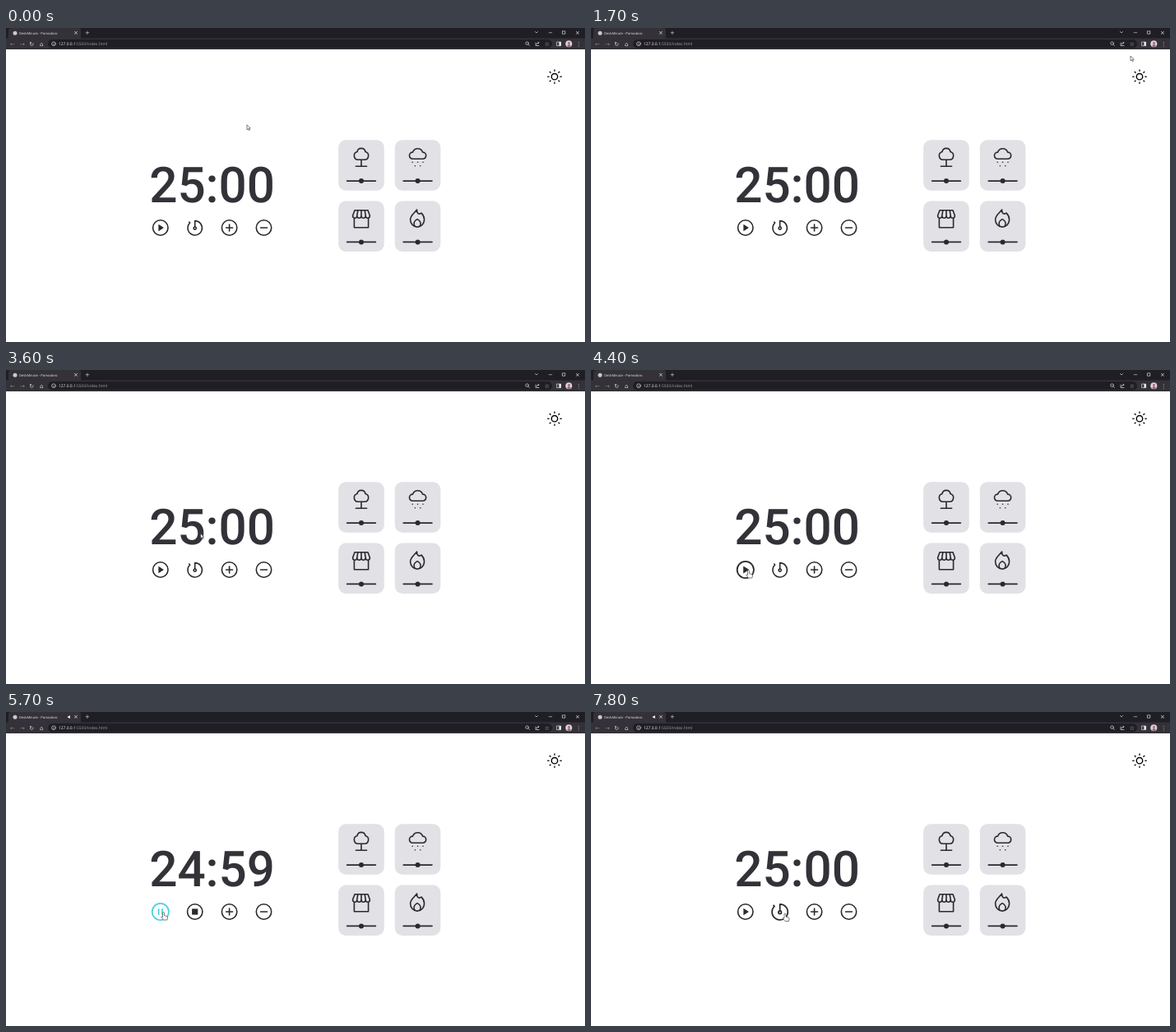
Write an HTML page that moves like this. It is 704 px wide and 382 px high and loops after 8 s.

```html
<!DOCTYPE html>
<html lang="en">
<head>
<meta charset="utf-8">
<title>Pomodoro</title>
<style>
  html, body { margin: 0; width: 100%; height: 100%; overflow: hidden; background: #fff; }
  svg { display: block; width: 100vw; height: 100vh; color: #29292e; }
  text { text-rendering: geometricPrecision; }
  .ui { font-family: "Open Sans", "Noto Sans", sans-serif; }
  .glyph { font: 7px "DejaVu Sans", sans-serif; fill: #dcdce0; text-anchor: middle; }
  .line { fill: none; stroke-linecap: round; stroke-linejoin: round; }
  .chrome { stroke: #dcdce0; stroke-width: .7; }
  .icon { stroke: currentColor; stroke-width: 1.6; }
  .solid { fill: currentColor; }
  .running { color: #4dd0e6; }
  .hidden { display: none; }
  #clock { font: 500 60.2px Roboto, sans-serif; fill: #323238; text-anchor: middle; }
</style>
</head>
<body>
<svg viewBox="0 0 704 382" preserveAspectRatio="none">
  <defs>
    <g id="card">
      <rect x="-27.8" width="55.6" height="61.4" rx="9" fill="#e1e1e6"/>
      <path class="line icon" d="M-17.4 49.8h34.8"/>
      <circle class="solid" cy="49.8" r="3"/>
    </g>
    <circle id="ring" class="line icon" r="9.2"/>
  </defs>

  <!-- browser window -->
  <rect width="704" height="26" fill="#1f1e24"/>
  <rect x="3" width="88" height="16" rx="3" fill="#343238"/>
  <rect y="12.5" width="704" height="13.5" fill="#343238"/>
  <rect x="51" y="14" width="613" height="10.4" rx="5.2" fill="#1f1e24"/>
  <circle cx="11" cy="6.2" r="2.5" fill="#c9c9ce"/>
  <text class="ui" x="16" y="7.7" font-size="4.1" fill="#ececf0">DeskMinute - Pomodoro</text>
  <path id="sound" d="M75 5.2h1L78 4v4L76 7H75z" fill="#e6e6ea"/>
  <text class="glyph" x="85 99 662 695" y="8.4">×+−×</text>
  <text class="glyph" x="8 20" y="21.6" opacity=".5">←→</text>
  <text class="glyph" x="31.3 43.2 657.8 696.3" y="21.6">↻⌂☆⋮</text>
  <g class="line chrome">
    <path d="M643.5 4.5l1.5 1.5 1.5-1.5M635 20l1.5 1.5M645 20q0-2 3-2l-1-1m1 1l-1 1M644 18v3.5h4"/>
    <circle cx="58" cy="19.2" r="2.4"/>
    <path d="M58 19v1.3"/>
    <circle cx="633.6" cy="18.6" r="1.8"/>
    <rect x="676.8" y="3.8" width="3" height="3.4"/>
    <rect x="670" y="17" width="4.6" height="4.6"/>
  </g>
  <rect x="672.4" y="17" width="2.4" height="4.6" fill="#ececf0"/>
  <circle cx="684.3" cy="19.2" r="4" fill="#e3cfd6"/>
  <circle cx="684.5" cy="18.4" r="1.4" fill="#8e6674"/>
  <ellipse cx="684.5" cy="21.5" rx="2" ry="1.5" fill="#8e6674"/>
  <text class="ui" x="64" y="20.9" font-size="4.9" fill="#a09fa6"><tspan fill="#f2f2f5">127.0.0.1</tspan>:5500/index.html</text>

  <!-- theme switch: the rays are a dashed circle -->
  <g transform="translate(667 59.2)" fill="none" stroke="#000">
    <circle r="3.7" stroke-width="1.4"/>
    <circle r="7.5" stroke-width="2.4" pathLength="80" stroke-dasharray="2.2 7.8" stroke-dashoffset="1.1"/>
  </g>

  <text id="clock" x="250.6" y="212">25:00</text>

  <!-- controls -->
  <g class="button">
    <use href="#ring"/>
    <path id="play" class="solid" d="M-2.4-4.2L4.1 0l-6.5 4.2z"/>
    <path id="pause" class="line icon" d="M-2-2.8v5.6M2-2.8v5.6"/>
  </g>
  <g class="button">
    <g id="timer" class="line icon">
      <path d="M0-1V-8.4A8.7 8.7 0 1 1-6-6L-7-7"/>
      <circle cy=".6" r="1.6"/>
    </g>
    <g id="stop"><use href="#ring"/><rect class="solid" x="-3.6" y="-3.6" width="7.2" height="7.2"/></g>
  </g>
  <g class="button"><use href="#ring"/><path class="line icon" d="M-4 0h8M0-4v8"/></g>
  <g class="button"><use href="#ring"/><path class="line icon" d="M-4 0h8"/></g>

  <!-- sound cards -->
  <g class="card">
    <use href="#card"/>
    <path class="line icon" d="M-4 24h8a5 5 0 0 0 1-9.8 5.1 5.1 0 0 0-10 0 5 5 0 0 0 1 9.8zM0 24v8M-6.6 32H6.6"/>
  </g>
  <g class="card">
    <use href="#card"/>
    <path class="line icon" d="M-6 23h12a4 4 0 0 0 0-8.2 6.3 6.3 0 0 0-12 0 4 4 0 0 0 0 8.2z"/>
    <path class="line icon" stroke-dasharray="0 6.4" d="M-6.4 27h13M-3.2 31.4h7"/>
  </g>
  <g class="card">
    <use href="#card"/>
    <path class="line icon" d="M-8 11.2h16l2.4 6.4a2.6 3 0 0 1-5.2 0 2.6 3 0 0 1-5.2 0 2.6 3 0 0 1-5.2 0 2.6 3 0 0 1-5.2 0zM-5.2 17.6l1-6.4M0 17.6v-6.4M5.2 17.6l-1-6.4M-8.6 21v11.2H8.6V21"/>
  </g>
  <g class="card">
    <use href="#card"/>
    <path class="line icon" d="M-1 10.5c0 3 1 5 3 5 1 0 2-1 2.5-1 2 2 3.5 5 3.5 8a8.5 9 0 0 1-17 0c0-5 5-8 8-12zM-.5 22c2 1 4 3 4 5.5a4 4 0 0 1-8 0c0-2.5 2-4.5 4-5.5z"/>
  </g>

  <g id="cursor" fill="#fff" stroke="#29292e" stroke-width=".6" stroke-linejoin="round">
    <path id="arrow" d="M0 0v6l1.4-1.2 1 2 1-.5-1-2h1.8z"/>
    <path id="hand" d="M-1 .5a1 1 0 0 1 2 0v3l3 1q1 0 1 1.5L4.4 9H0L-2.4 6q-.6-1 .3-1.3l1.1.7z"/>
  </g>
</svg>
<script>
const STEP = 100, STEPS = 80;
const $ = id => document.getElementById(id);
const all = name => [...document.querySelectorAll(name)];
const show = (id, on) => $(id).classList.toggle('hidden', !on);
const place = (el, x, y, scale = 1) =>
  el.setAttribute('transform', `translate(${x} ${y}) scale(${scale})`);

// pointer moves: each one bends towards `via` on its way to `to`
const start = [293, 117.8];
const moves = [
  { from: 0, until: 8, via: [250, 268], to: [242.5, 134] },
  { from: 16, until: 17, via: [450, 84], to: [656, 34] },
  { from: 17, until: 26, via: [571, 163], to: [501.5, 121] },
  { from: 26, until: 32, via: [420, -10], to: [250, 182] },
  { from: 33, until: 42, via: [225, 215], to: [191.5, 244] },
  { from: 59, until: 63, via: [215, 255], to: [236, 245.5] }
];
const ease = k => k * k * (3 - 2 * k);
const mix = (a, b, k) => a.map((v, i) => v + (b[i] - v) * k);

function pointer(step) {
  let at = start;
  for (const { from, until, via, to } of moves) {
    if (step <= from) break;
    const k = ease(Math.min(1, (step - from) / (until - from)));
    at = mix(mix(at, via, k), mix(via, to, k), k);
  }
  return at;
}

const buttons = all('.button').map((el, i) => ({ el, x: 187.8 + 41.9 * i, y: 243 }));
all('.card').forEach((el, i) => place(el, 432 + 68.6 * (i % 2), 136.3 + 74.3 * (i >> 1)));

function draw(step) {
  const [x, y] = pointer(step);
  const running = step >= 47 && step < 71;
  const hot = buttons.find(b => Math.hypot(x - b.x, y - b.y) < 10);
  const left = running ? 1500 - Math.max(0, Math.floor((step - 47) / 10)) : 1500;
  for (const b of buttons) place(b.el, b.x, b.y, b === hot ? 1.1 : 1);
  buttons[0].el.classList.toggle('running', running);
  show('play', !running);
  show('pause', running);
  show('timer', !running);
  show('stop', running);
  show('sound', step >= 52);
  show('arrow', !hot);
  show('hand', hot);
  place($('cursor'), x, y);
  $('clock').textContent = Math.floor(left / 60) + ':' + String(left % 60).padStart(2, '0');
}

function tick() {
  draw(Math.floor(performance.now() / STEP) % STEPS);
  requestAnimationFrame(tick);
}
tick();
</script>
</body>
</html>
```
